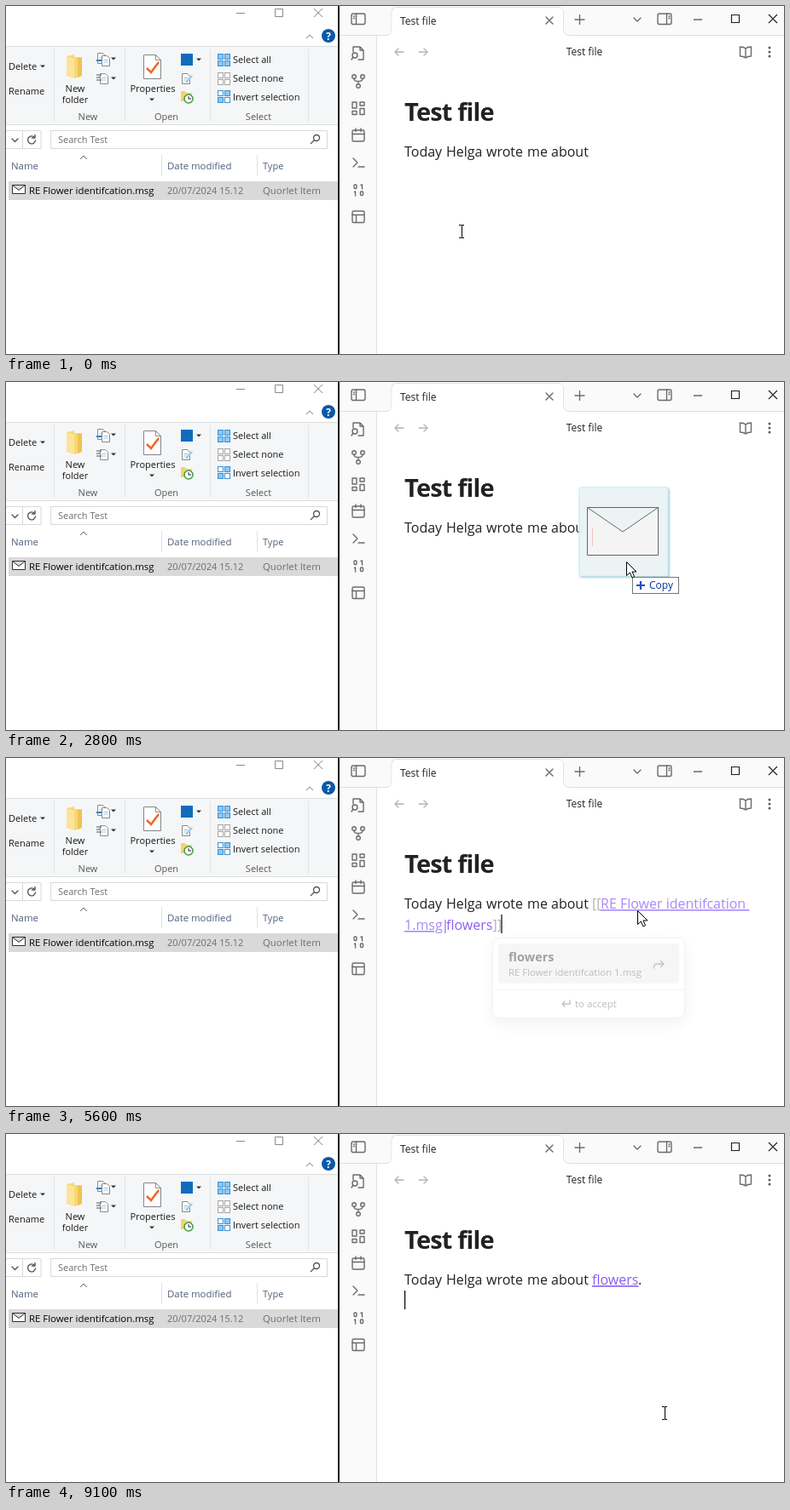
Recreate the animation shown at these times as an HTML page. Size 912 by 409 pixels, loop 9200 ms.

```html
<!DOCTYPE html>
<html lang="en">
<head>
<meta charset="utf-8">
<title>Drag a mail into a note</title>
<style>
html, body { margin: 0; width: 100%; height: 100%; overflow: hidden; background: #fff; }
svg { display: block; width: 912px; height: 409px; }
text { font-family: "Open Sans", "Noto Sans", sans-serif; font-size: 11px; font-variant-ligatures: none; white-space: pre; fill: #1a1a1a; }
.mid { text-anchor: middle; }
.wide { font-size: 11.4px; }
.ui { font-size: 12px; fill: #222; }
.soft { fill: #6d6d6d; }
.head { fill: #4c607a; }
.note { font-size: 16px; fill: #222; }
.link { fill: #a68af9; text-decoration: underline; }
.alias { fill: #8f5ff0; }
.mark { fill: #b3b3b3; }
.line { fill: none; stroke: #6b6b6b; stroke-width: 1.4; stroke-linecap: round; stroke-linejoin: round; }
.thin { fill: none; stroke: #8a8a8a; }
.black { fill: none; stroke: #222; }
</style>
</head>
<body>
<svg viewBox="0 0 912 409">
  <defs>
    <path id="drop" d="M-3-1.5h6l-3 3z" fill="#333"/>
    <g id="page"><path d="M.5.5h6l3 3v9h-9z" fill="#fff" stroke="#8b8b8b"/><path d="M2.5 5.5h5M2.5 8h5" stroke="#9cc3e6"/></g>
    <filter id="shade" x="-30%" y="-30%" width="160%" height="190%"><feDropShadow dx="0" dy="7" stdDeviation="9" flood-opacity=".13"/></filter>
    <filter id="glow" x="-20%" y="-20%" width="140%" height="140%"><feDropShadow dx="1" dy="1" stdDeviation="1.2" flood-color="#5fa9b5" flood-opacity=".8"/></filter>
  </defs>
  <rect width="912" height="409" fill="#fff"/>

  <!-- file window -->
  <path class="thin" d="M270 8.5h10M315.5 3.5h9v9h-9zM361 3l10 10M371 3l-10 10"/>
  <path class="thin" d="M352 38l4-4 4 4"/>
  <circle cx="378" cy="35" r="8" fill="#0c59a8"/>
  <text class="mid" x="378" y="39.5" style="fill:#fff;font-size:12px;font-weight:700">?</text>
  <rect y="47" width="389" height="93" fill="#f5f6f7"/>
  <path d="M0 47.5h389M0 139.5h389" stroke="#dcdddd"/>
  <path d="M56.5 51v85M139.5 51v85M239.5 51v85M354.5 51v85" stroke="#e2e3e4"/>
  <text x="3" y="75">Delete</text><text x="3" y="104">Rename</text>
  <use href="#drop" x="43" y="71"/>
  <path d="M71 59l9-2v3h9v22l-9 3-9-3z" fill="#f8d775"/><path d="M71 59l9 3v23l-9-3z" fill="#fbe49b"/><path d="M84 61h5v21l-5 2z" fill="#efc352"/>
  <text class="mid" x="81" y="101">New</text><text class="mid" x="81" y="114">folder</text>
  <use href="#page" x="107" y="55"/><use href="#page" x="112" y="58"/><path d="M106 64h6" stroke="#2d84c8" stroke-width="2"/>
  <use href="#page" x="110" y="79"/><path d="M106 81h6M106 84h4M106 87h6" stroke="#555"/>
  <use href="#drop" x="126" y="62"/><use href="#drop" x="126" y="85"/>
  <path d="M161.500 57.500h14l6 6v22h-20z" fill="#fff" stroke="#858585"/><path d="M175.500 57.500v6h6" class="thin"/>
  <path d="M165 73l5 5 9-12" fill="none" stroke="#f0682a" stroke-width="2.6"/>
  <text class="mid" x="172" y="101">Properties</text><use href="#drop" x="171" y="110"/>
  <rect x="205" y="56" width="14" height="14" fill="#0f6cbd"/><use href="#drop" x="226" y="63"/>
  <use href="#page" x="206" y="79"/><path d="M211 90l7-8" stroke="#a9cbe6" stroke-width="2.500"/>
  <path d="M205 100h5l1 2h7v10h-13z" fill="#f5d36a"/><circle cx="214" cy="109" r="5" fill="#fff" stroke="#3a9a4a" stroke-width="1.500"/><path d="M214 106v3h3" class="black"/>
  <g id="tiles"></g>
  <text x="266" y="67">Select all</text><text x="266" y="89">Select none</text><text x="266" y="111">Invert selection</text>
  <g class="mid" opacity=".72"><text x="96" y="134">New</text><text x="188" y="134">Open</text><text x="296" y="134">Select</text></g>
  <path d="M-1 146.500h42v21H-1M19.500 147v20M52.500 146.500h324v21h-324z" fill="none" stroke="#d9d9d9"/>
  <path class="line" style="stroke:#555" d="M7 156l3.500 3.500 3.500-3.500M33.500 154.500a4.500 4.500 0 1 0 1 3.500M34 151.500v3.500h-3.500"/>
  <text class="soft" x="61" y="161">Search Test</text>
  <circle class="line" cx="364" cy="155" r="3.500" style="stroke:#555"/><path class="line" style="stroke:#555" d="M361 158l-3.500 3.500"/>
  <path class="thin" style="stroke:#666" d="M87 180l4-4 4 4"/>
  <path d="M182.500 175v25M294.500 175v25" stroke="#e3e3e3"/>
  <text class="head wide" x="6" y="192">Name</text><text class="head wide" x="189" y="192">Date modified</text><text class="head" x="301" y="192">Type</text>
  <rect id="row" x="3.500" y="206.500" width="388" height="21"/>
  <path d="M7.500 210.500h15v10h-15zl7.500 6 7.500-6" fill="#fff" stroke="#333"/>
  <text class="wide" x="27" y="221" style="fill:#000">RE Flower identifcation.msg</text>
  <text class="soft" x="189" y="221">20/07/2024 15.12</text><text class="soft wide" x="301" y="221">Quorlet Item</text>

  <!-- note window -->
  <rect x="391" width="521" height="409" fill="#fff"/>
  <path d="M391 0h521v35H435v374h-44z" fill="#fafafa"/>
  <path d="M434.500 35v374M391 34.500h54q7 0 7-7V8q0-6.500 7-6.500h188q6.500 0 6.500 6.500v19.500q0 7 7 7H912" fill="none" stroke="#e0e0e0"/>
  <path d="M447 35q5.500-1 5.500-8V8q0-6 6.500-6h188q6 0 6 6v19q0 7 5.500 8z" fill="#fff"/>
  <rect x="389" width="2" height="409" fill="#1e1e1e"/>
  <g class="line">
    <rect x="405" y="9" width="16" height="12.500" rx="2"/><path d="M410.500 9v12M407.500 12h1M407.500 14.500h1"/>
    <rect x="764" y="9" width="16" height="12.500" rx="2"/><path d="M774.500 9v12M777 12h1M777 14.500h1"/>
    <path d="M633 13l8 8M641 13l-8 8M667 16h11M672.500 10.500v11M736 14l4 4 4-4"/>
    <path stroke="#b5b5b5" d="M466 54h-10l4-4M456 54l4 4M484 54h10l-4-4M494 54l-4 4"/>
    <path d="M867 50q-2-2-6.500-2v11q4.500 0 6.500 2 2-2 6.500-2V48q-4.500 0-6.500 2v11"/>
    <path d="M407 54v-6h8l4 4v11h-6M415 48v4h4"/><circle cx="409" cy="58" r="3"/><path d="M407 60l-2 3"/>
    <circle cx="408" cy="83" r="2.300"/><circle cx="418" cy="83" r="2.300"/><circle cx="413" cy="94" r="2.300"/><path d="M408 85.500q0 3 5 3t5-3M413 88.500v3"/>
    <path d="M406 113h5v7h-5zM415 113h5v4h-5zM415 120.500h5v7h-5zM406 123.500h5v4h-5z"/>
    <rect x="406" y="146" width="14" height="13" rx="1.500"/><path d="M406 150.500h14M410 144v3.500M416 144v3.500"/>
    <path d="M407 179l5 5-5 5M413 189h7"/>
    <rect x="408" y="210" width="3" height="4.500" rx="1"/><path d="M416 210.500l1.500-.500v5M408.500 218.500l1-.500v5"/><rect x="415.500" y="218" width="3" height="4.500" rx="1"/>
    <rect x="406" y="241" width="14" height="13.500" rx="1.500"/><path d="M406 245.500h14M410.500 245.500v9"/>
  </g>
  <path class="black" d="M806 16h10M850.500 10.500h9v9h-9zM894 10l10 10M904 10l-10 10" stroke-width="1.200"/>
  <g fill="#5c5c5c"><circle cx="895" cy="49" r="1.500"/><circle cx="895" cy="54" r="1.500"/><circle cx="895" cy="59" r="1.500"/></g>
  <text class="ui" x="462" y="22">Test file</text><text class="ui mid" x="678" y="58">Test file</text>
  <text x="467" y="135" style="font-size:29px;font-weight:700;letter-spacing:-.85px;fill:#222">Test file</text>
  <text class="note" y="177"><tspan x="467">Today</tspan><tspan x="516">Helga</tspan><tspan x="563">wrote</tspan><tspan x="611">me</tspan><tspan x="639">about</tspan></text>

  <g id="raw">
    <rect id="sel" x="516" y="184" height="24" fill="#e3d9f7"/>
    <text class="note" y="177"><tspan class="mark" x="687">[[</tspan><tspan class="link" x="697">RE Flower identifcation </tspan></text>
    <text class="note" y="202"><tspan class="link" x="467">1.msg</tspan><tspan class="alias" x="510.500">|</tspan><tspan class="alias" id="alias" x="516"></tspan><tspan class="mark">]]</tspan></text>
  </g>
  <text id="done" class="note" y="177"><tspan id="word" class="link" x="687">flowers</tspan><tspan x="741">.</tspan></text>
  <rect id="caret" width="1.200" height="22" fill="#000"/>

  <g id="popup">
    <rect x=".5" y="211.500" width="225" height="94" rx="8" fill="#fff" stroke="#dedede" filter="url(#shade)"/>
    <rect x="7" y="218" width="212" height="47" rx="4" fill="#ebebeb"/>
    <text id="query" x="19" y="239" style="font-size:14.500px;font-weight:700"></text>
    <text class="wide" x="19" y="256" style="fill:#5c5c5c">RE Flower identifcation 1.msg</text>
    <path class="line" d="M189.500 247v-1q0-4 4-4h7M197.500 238.500l3.500 3.500-3.500 3.500"/>
    <path d="M1 272.500h224" stroke="#e6e6e6"/>
    <path class="line" d="M91 285v4h-9M85 286l-3 3 3 3"/>
    <text x="97" y="293" style="font-size:11.500px;fill:#5c5c5c">to accept</text>
  </g>

  <g id="ghost">
    <rect x="-55" y="-87" width="104" height="104" rx="2" fill="#f1f8f9" fill-opacity=".9" stroke="#c8eef3" filter="url(#glow)"/>
    <path d="M-45.500-63.500h83v56h-83zL-4-35 37.500-63.500" fill="#f4f4f4" stroke="#666"/>
    <path d="M-39.500-39v21" stroke="#f2c4c4"/>
    <g id="tip">
      <rect x="7.500" y="18.500" width="54" height="19" fill="#fff" stroke="#767676"/>
      <path d="M12 28h10M17 23v10" stroke="#1c4fc4" stroke-width="2.200"/>
      <text x="27" y="32" style="font-size:12px;fill:#0a3399">Copy</text>
    </g>
  </g>
  <path id="arrow" d="M.5.5v16l3.800-3.500 2.700 6 2.600-1.200-2.600-5.800h5z" fill="#fff" stroke="#000"/>
  <path id="beam" class="black" style="stroke:#000" d="M-3-7.500h2.500l.500.500.500-.500H3M-3 7.500h2.500l.500-.500.500.500H3M.5-7V7"/>
</svg>
<script>
const LOOP = 9200, STEP = 100;
const $ = id => document.getElementById(id);
const show = (id, on) => $(id).style.display = on ? '' : 'none';
const move = (id, x, y) => $(id).setAttribute('transform', `translate(${x} ${y})`);
const set = (id, attrs) => Object.entries(attrs).forEach(([k, v]) => $(id).setAttribute(k, v));

// pointer path: time, x, y
const path = [
  [800, 534, 265], [1000, 482, 278], [1200, 330, 262], [1400, 172, 231], [1600, 125, 222],
  [1900, 125, 219], [2100, 205, 216], [2500, 590, 214], [2800, 727, 211],
  [3000, 741, 177], [3400, 740, 179], [7000, 740, 179], [7100, 745, 173],
  [7300, 768, 262], [7500, 772, 328]
];

function pointer(t) {
  const i = path.findIndex(p => p[0] > t);
  if (i < 0) return path[path.length - 1].slice(1);
  if (i === 0) return path[0].slice(1);
  const [a, b] = [path[i - 1], path[i]];
  const k = (t - a[0]) / (b[0] - a[0]);
  return [1, 2].map(n => Math.round(a[n] + (b[n] - a[n]) * k));
}

const typed = t => t < 4500 ? '' : 'flowers'.slice(0, t >= 5000 ? 7 : (t - 4500) / STEP + 1);
const blink = (t, from, span) => t >= from && Math.floor((t - from) / span) % 2 === 0;

function caret(t, width) {
  if (t < 3400) return [687, 159, blink(t, 400, 500)];
  if (t < 4500) return [516 + width, 184, t < 4100];
  if (t < 5600) return [516 + width, 184, true];
  if (t < 6000) return [526 + width, 184, true];
  if (t < 6200) return [744, 159, true];
  return [467, 184, blink(t, 6200, 475)];
}

function draw(t) {
  const [x, y] = pointer(t);
  const drag = t >= 1900 && t < 3400;
  const beam = !drag && x > 435 && (t < 1900 || t >= 7100);
  show('beam', beam);
  show('arrow', !beam);
  move('beam', x, y);
  move('arrow', x, y);
  show('ghost', drag);
  show('tip', x > 391);
  move('ghost', x, y);

  const hover = t < 3000 && x < 389 && y > 206 && y < 232;
  set('row', { fill: hover ? '#cce8ff' : '#d9d9d9', stroke: hover ? '#99d1ff' : '#d9d9d9' });

  show('raw', t >= 3400 && t < 6000);
  show('done', t >= 6000);
  $('word').style.fill = t < 6200 ? '' : '#8a5cf0';
  $('alias').textContent = t < 4500 ? 'attachment' : typed(t);
  const width = t >= 3400 && t < 6000 ? $('alias').getComputedTextLength() : 0;
  set('sel', { width: t < 4500 ? width : 0 });

  const query = typed(t - STEP);
  show('popup', query && t < 5700);
  if (query && t < 5700) {
    $('alias').textContent = query;
    move('popup', Math.round(516 + $('alias').getComputedTextLength()), 0);
    $('alias').textContent = typed(t);
    $('query').textContent = query;
    $('popup').style.opacity = t < 5600 ? 1 : .4;
  }

  const [cx, cy, on] = caret(t, width);
  set('caret', { x: cx, y: cy });
  show('caret', on);
}

// selection icons: which of the four tiles are filled
$('tiles').innerHTML = [[56, 15], [78, 0], [99, 6]].map(([top, mask]) =>
  [0, 1, 2, 3].map(i => {
    const full = mask >> i & 1, edge = mask ? '#3b8fd0' : '#a5a5a5';
    return `<rect x="${248.5 + i % 2 * 8}" y="${top + .5 + (i >> 1) * 8}" width="6" height="6" fill="${full ? '#8cc8f2' : '#fff'}" stroke="${edge}"/>`;
  }).join('')).join('');

const start = performance.now();
let last = -1;
function tick() {
  const t = Math.floor((performance.now() - start) % LOOP / STEP) * STEP;
  if (t !== last) draw(last = t);
  requestAnimationFrame(tick);
}
tick();
</script>
</body>
</html>
```
